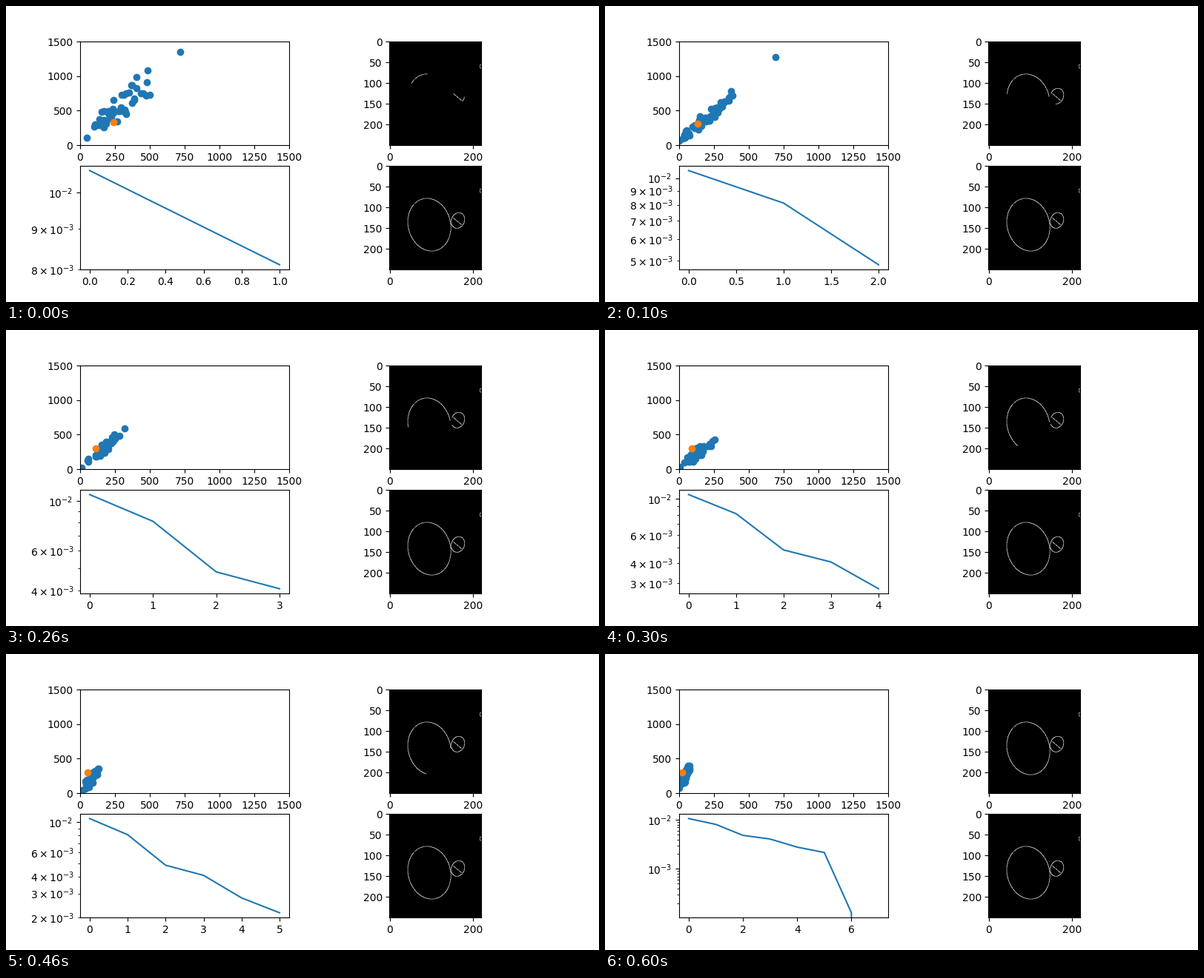
Write a matplotlib script that moves like this. It is 800x400 px and loops after 0.7 s.

```python
import numpy as np
import matplotlib.pyplot as plt
from matplotlib.animation import FuncAnimation

H, W = 250, 220
STEPS = 7

# Skewed ellipses: centre x, y, radii, skew
BODY = (95.5, 141.5, 51.5, 63.5, 0.11)
LOOP = (164, 131.3, 16, 18.8, -0.15)
FULL = (-180, 180)

# Visible arc per step, clockwise degrees from the top
BODY_ARCS = [(-46, -4), (-73, 80), (-98, 80), (-154, 84), (-173, 90), (-186, 169), (-186, 174)]
LOOP_ARCS = [(97, 143), (-65, 189), (-65, 230), (-65, 236), FULL, FULL, FULL]

# Share of differing pixels after each generation
LOSS = np.array([586, 446, 266, 224, 153, 119, 7, 0]) / (H * W)

# Each generation lies along a ridge: lower end, upper end, mean place, spread
RIDGES = [((50, 110), (721, 1355), 0.36, 170),
          ((0, 60), (692, 1275), 0.3, 80),
          ((10, 20), (320, 590), 0.55, 60),
          ((5, 30), (253, 430), 0.5, 70),
          ((0, 10), (135, 350), 0.55, 60),
          ((0, 10), (85, 340), 0.65, 60),
          ((0, 75), (75, 400), 0.6, 50)]
BEST = [(240, 327), (133, 311), (112, 295), (90, 300), (53, 300), (35, 321), (19, 300)]


def plot_pixels(img, x, y):
    img[np.rint(y).astype(int), np.rint(x).astype(int)] = 1


def outline(img, shape, arc):
    cx, cy, rx, ry, skew = shape
    t = np.linspace(0, 2 * np.pi, 2000)
    x, y = cx + rx * np.cos(t), cy + ry * np.sin(t + skew)
    angle = np.degrees(np.arctan2(x - cx, cy - y))
    show = (angle - arc[0]) % 360 <= arc[1] - arc[0]
    plot_pixels(img, x[show], y[show])


def edges(body=FULL, loop=FULL):
    img = np.zeros((H, W))
    outline(img, BODY, body)
    outline(img, LOOP, loop)
    plot_pixels(img, np.linspace(153, 173, 60), np.linspace(125, 142, 60))
    t = np.linspace(-1, 1, 20)
    plot_pixels(img, 217 + 2 * t**4, 59.5 + 4.5 * t)
    return img


def population(k, n=48):
    low, high, mean, spread = RIDGES[k]
    rng = np.random.default_rng(k)
    u = rng.beta(6 * mean, 6 * (1 - mean), n)
    u[0], u[-1] = 0, 1
    width = 2 * spread * np.sqrt(u * (1 - u))
    x = low[0] + (high[0] - low[0]) * u + 0.3 * width * rng.uniform(-1, 1, n)
    y = low[1] + (high[1] - low[1]) * u + width * rng.uniform(-1, 1, n)
    return np.maximum(x, 0), np.maximum(y, 0)


fig, ((ax_pop, ax_try), (ax_loss, ax_goal)) = plt.subplots(2, 2, figsize=(8, 4), dpi=100)


def draw(k):
    for ax in fig.axes:
        ax.clear()
    ax_pop.scatter(*population(k))
    ax_pop.scatter(*BEST[k])
    ax_pop.set(xlim=(0, 1500), ylim=(0, 1500), xticks=range(0, 1501, 250))
    ax_loss.semilogy(LOSS[:k + 2])
    ax_try.imshow(edges(BODY_ARCS[k], LOOP_ARCS[k]), cmap="gray", vmin=0, vmax=1)
    ax_goal.imshow(edges(), cmap="gray", vmin=0, vmax=1)
    return []


anim = FuncAnimation(fig, draw, frames=STEPS, init_func=lambda: [],
                     interval=100, repeat=True, repeat_delay=0)
plt.show()
```
